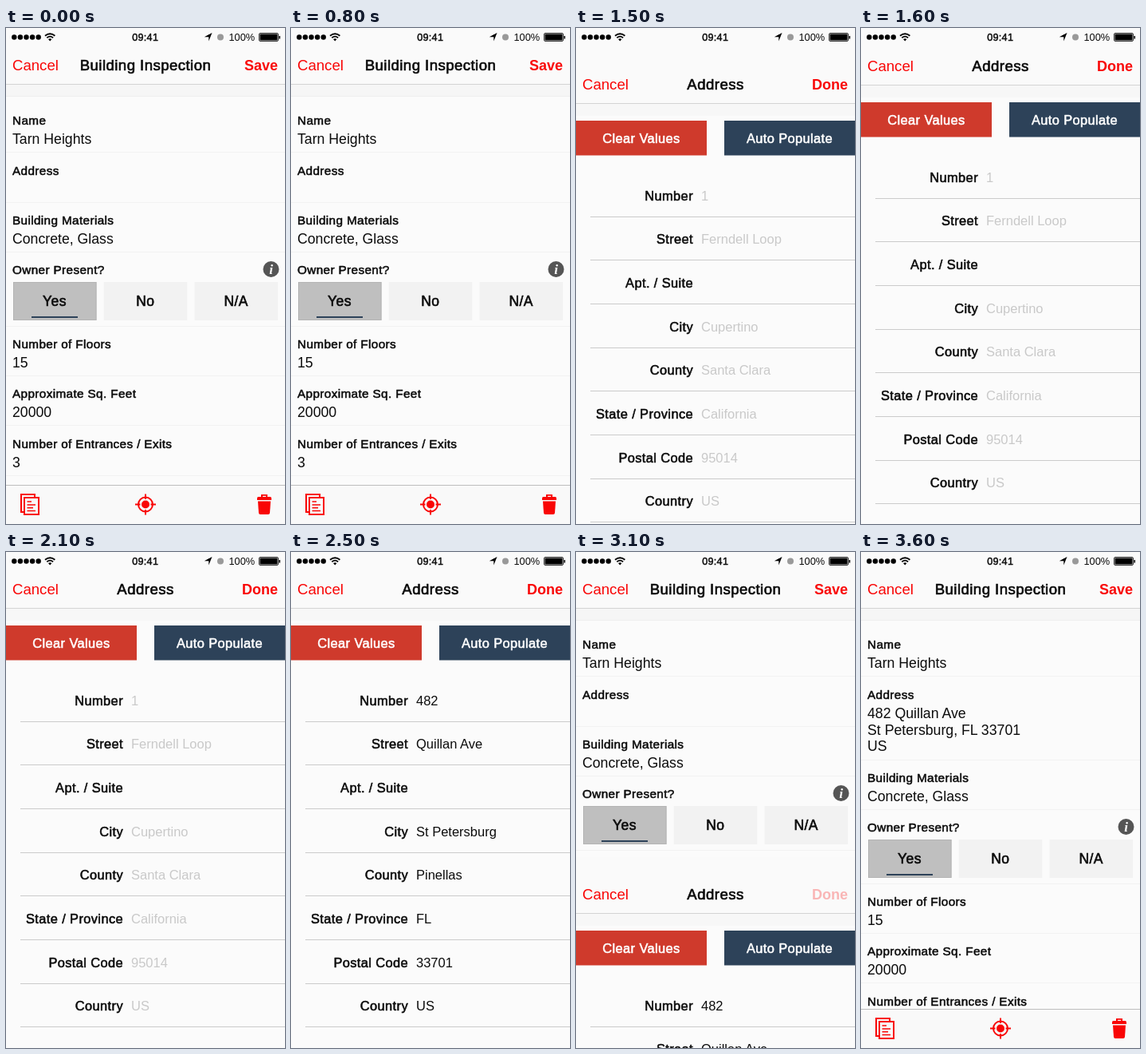
An HTML page that plays this animation: 350x621 px, repeating every 4.4 s.

```html
<!DOCTYPE html>
<html lang="en">
<head>
<meta charset="utf-8">
<title>Building Inspection</title>
<style>
html, body { margin: 0; width: 100%; height: 100%; overflow: hidden; background: #fafafa; }
svg { display: block; width: 100vw; height: 100vh; font-family: "Liberation Sans", Arial, sans-serif; }
.medium { letter-spacing: .024em; stroke-width: .036em; stroke-linejoin: round; }
</style>
</head>
<body>
<svg id="stage" viewBox="0 0 350 621"></svg>
<script>
const LOOP = 4400, STEP = 100, HEIGHT = 621, GROW = 42;
const OPEN_AT = 1356.4, CLOSE_AT = 3041;
const RED = '#f90606', INK = '#0c0c0c', NAVY = '#2d4259', HINT = '#c9c9c9', RULE = '#f2f2f2';

// Markup helpers; text is centred on y by its cap height.
const rect = (x, y, w, h, fill, extra = '') =>
  `<rect x="${x}" y="${y}" width="${w}" height="${h}" fill="${fill}" ${extra}/>`;
const circle = (x, y, r, fill) => `<circle cx="${x}" cy="${y}" r="${r}" fill="${fill}"/>`;
const line = (x, y, color) => rect(x, y, 350 - x, 1, color);
const text = (s, x, y, size, { weight, fill = INK, anchor = 'start', id } = {}) => {
  const look = weight === 'bold' ? 'font-weight="700"'
    : weight === 'medium' ? `class="medium" stroke="${fill}"` : '';
  return `<text x="${x}" y="${y + size * 0.36}" font-size="${size}" fill="${fill}" ` +
    `text-anchor="${anchor}" ${look}${id ? ` id="${id}"` : ''}>${s}</text>`;
};

const field = (label, y, value = '') =>
  text(label, 8, y, 15.3, { weight: 'medium' }) + text(value, 8, y + 23.3, 17.7);

const navBar = (title, action, id) =>
  rect(0, 0, 350, 70, '#fafafa') + line(0, 70, '#d4d4d4') +
  text('Cancel', 8, 46, 18.6, { fill: RED }) +
  text(title, 175, 46.2, 18.6, { weight: 'medium', anchor: 'middle' }) +
  text(action, 341, 46.2, 18, { weight: 'bold', fill: RED, anchor: 'end', id });

function choices() {
  const boxes = ['Yes', 'No', 'N/A'].map((name, i) => {
    const x = 9 + i * 113.8;
    return rect(x, 318, 104.5, 48, i ? '#f2f2f2' : '#bfbfbf') +
      text(name, x + 52, 341.8, 17.5, { weight: 'medium', anchor: 'middle' });
  });
  return boxes.join('') + rect(9.5, 318.5, 103.5, 47, 'none', 'stroke="#b4b4b4"') +
    rect(32, 361, 58, 2, NAVY);
}

const info = circle(332.5, 302, 10, '#555') +
  '<text x="332.5" y="307.5" font-family="Liberation Serif, serif" font-size="17" font-weight="700" ' +
  'font-style="italic" fill="#fff" text-anchor="middle">i</text>';

const toolbar = rect(0, 572, 350, 49, '#f9f9f9') + line(0, 572, '#bdbdbd') +
  `<g fill="none" stroke="${RED}" stroke-width="2">
    <path d="M22 606H19V584H36V587"/>
    <path d="M23 588H41V609H23Z"/>
    <path d="M26.5 593H32M26.5 597H37M26.5 600.8H34M26.5 604.5H37" stroke-width="1.4"/>
    <circle cx="175" cy="596.5" r="9"/>
    <path d="M175 583.5V590M175 603V609.5M162 596.5H168.5M181.5 596.5H188"/>
  </g>` + circle(175, 596.5, 5, RED) +
  `<path fill="${RED}" fill-rule="evenodd"
     d="M316.5 587H320V584H328V587H331.5Q333 587 333 589V591H315V589Q315 587 316.5 587ZM322 585.7V587H326V585.7Z"/>
   <path fill="${RED}" d="M316 592.5H332L331 607Q330.8 609 329 609H319Q317.2 609 317 607Z"/>`;

const form = rect(0, 0, 350, HEIGHT, '#fbfbfb') +
  rect(0, 71, 350, 15, '#f6f6f6') + line(0, 85, '#efefef') +
  field('Name', 115.5, 'Tarn Heights') + line(0, 155, RULE) +
  field('Address', 178) +
  '<g id="filled">' +
  ['482 Quillan Ave', 'St Petersburg, FL 33701', 'US']
    .map((s, i) => text(s, 8, 201.6 + i * 20.7, 17.7)).join('') + '</g>' +
  '<g id="lower">' +
  [218, 280, 373, 435, 497, 560].map(y => line(0, y, RULE)).join('') +
  field('Building Materials', 240.2, 'Concrete, Glass') +
  field('Owner Present?', 302.2) + info + choices() +
  field('Number of Floors', 395.5, '15') +
  field('Approximate Sq. Feet', 457.7, '20000') +
  field('Number of Entrances / Exits', 520, '3') + '</g>' +
  navBar('Building Inspection', 'Save', 'save') + toolbar;

// Label, placeholder, filled value
const rows = [
  ['Number', '1', '482'],
  ['Street', 'Ferndell Loop', 'Quillan Ave'],
  ['Apt. / Suite', '', ''],
  ['City', 'Cupertino', 'St Petersburg'],
  ['County', 'Santa Clara', 'Pinellas'],
  ['State / Province', 'California', 'FL'],
  ['Postal Code', '95014', '33701'],
  ['Country', 'US', 'US']
];

const button = (label, x, fill) => rect(x, 92, 164, 43.5, fill) +
  text(label, x + 82, 114, 16.4, { weight: 'medium', fill: '#fff', anchor: 'middle' });

const sheet = '<g id="sheet">' + rect(0, 0, 350, HEIGHT, '#fbfbfb') +
  rect(0, 71, 350, 15, '#f7f7f7') +
  navBar('Address', 'Done', 'done') +
  button('Clear Values', 0, '#cf3a2c') + button('Auto Populate', 186, NAVY) +
  rows.map(([label], i) => {
    const y = 185.7 + i * 54.65;
    return text(label, 147, y, 16.4, { weight: 'medium', anchor: 'end' }) +
      text('', 157, y, 16.5, { id: 'value' + i }) + line(18, Math.round(y + 26), '#cbcbcb');
  }).join('') + '</g>';

const status = [0, 1, 2, 3, 4].map(i => circle(10.3 + i * 7.6, 11.5, 3.2, '#000')).join('') +
  `<g fill="none" stroke="#000" stroke-width="1.8">
    <path d="M49 9.8Q55.2 4.6 61.4 9.8M51.3 12.3Q55.2 9 59.1 12.3"/>
    <rect x="317.5" y="6.5" width="24" height="10" rx="1.5" stroke-width=".8"/>
  </g>
  <path d="M53 14L55.2 16.4L57.4 14Q55.2 12.4 53 14Z"/>
  <path d="M258.5 6L254.3 16.5V11.2H248.8Z"/>` +
  circle(269, 11.5, 4, '#999') +
  rect(318.5, 7.5, 22, 8, '#000') + rect(342.5, 10, 1.5, 3.5, '#000') +
  text('09:41', 174.7, 11.3, 12.6, { weight: 'medium', anchor: 'middle' }) +
  text('100%', 279.5, 11.2, 12.8);

const $ = id => document.getElementById(id);
$('stage').innerHTML = form + sheet + status;

// Remaining share of a critically damped slide that began at t0.
function spring(t, t0) {
  const z = Math.max(0, t - t0) * 0.0352;
  return (1 + z) * Math.exp(-z);
}
const smooth = p => {
  p = Math.min(1, Math.max(0, p));
  return p * p * (3 - 2 * p);
};

function draw(t) {
  const hidden = t < CLOSE_AT ? spring(t, OPEN_AT) : 1 - spring(t, CLOSE_AT);
  $('sheet').setAttribute('transform', `translate(0 ${Math.round(HEIGHT * hidden)})`);
  $('done').style.opacity = t >= 3000 ? 0.28 : 1;

  const populated = t >= 2400;
  rows.forEach(([, hint, value], i) => {
    const cell = $('value' + i);
    cell.textContent = populated ? value : hint;
    cell.setAttribute('fill', populated ? INK : HINT);
  });

  $('filled').style.display = t > 3100 ? '' : 'none';
  $('lower').setAttribute('transform', `translate(0 ${GROW * smooth((t - 3100) / 160)})`);
}

const start = performance.now();
function tick() {
  const t = (performance.now() - start) % LOOP;
  draw(Math.floor(t / STEP) * STEP);
  requestAnimationFrame(tick);
}
tick();
</script>
</body>
</html>
```
